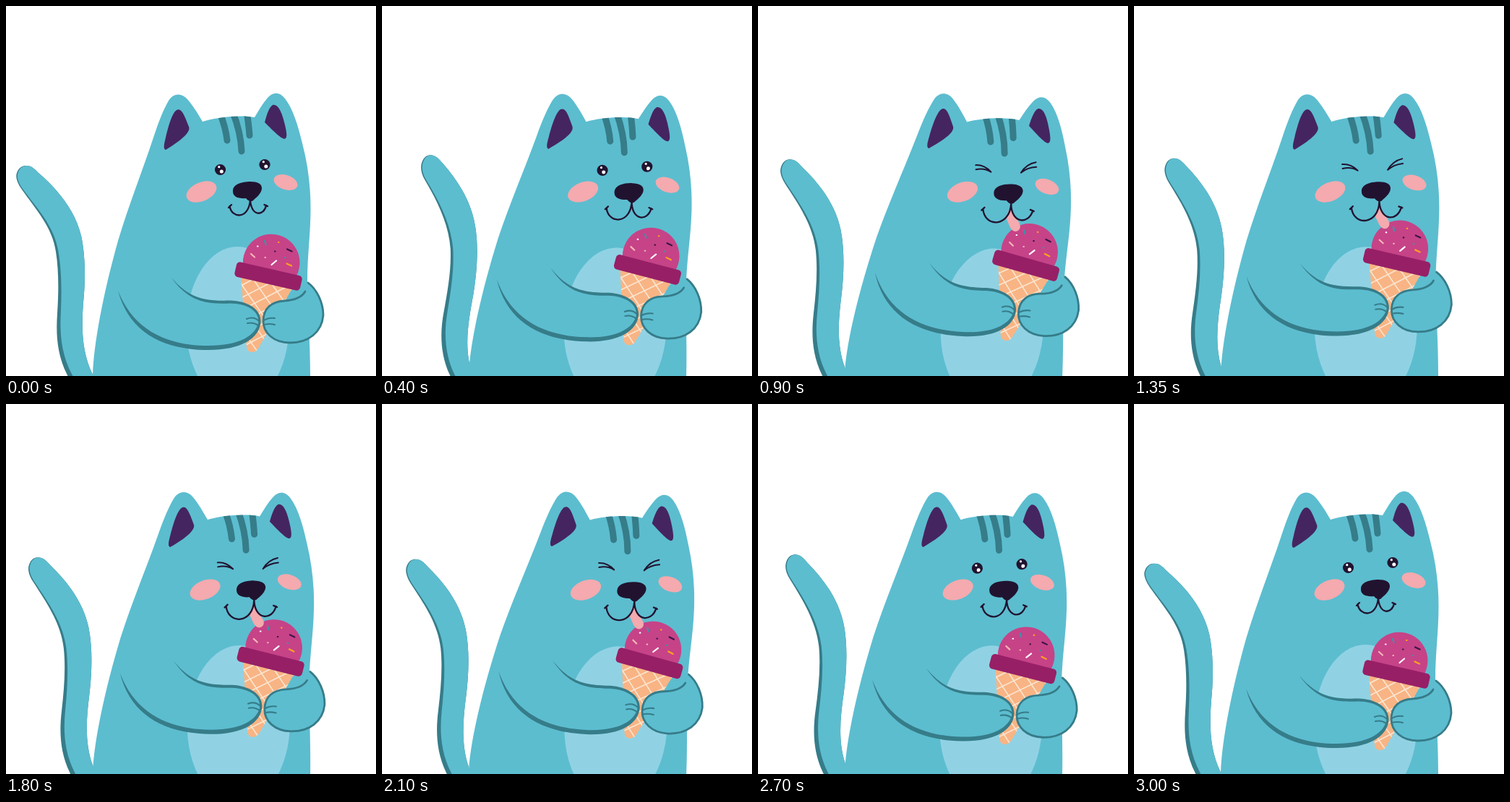
Animation of 512x512 px, one loop 3050 ms. Source, as an HTML page:

```html
<!DOCTYPE html>
<html lang="en">
<head>
<meta charset="utf-8">
<title>Cat with ice cream</title>
<style>
  html, body { margin: 0; width: 100%; height: 100%; overflow: hidden; background: #fff; }
  svg { display: block; width: 100vw; height: 100vh; }
  .skin { fill: #5cbdcf; }
  .shade { fill: #367c89; }
  .line { fill: none; stroke: #367c89; stroke-width: 2.1; stroke-linecap: round; }
  .ink { fill: #21132f; }
  .pen { fill: none; stroke: #21132f; stroke-width: 2.3; stroke-linecap: round; stroke-linejoin: round; }
  .pink { fill: #f4aaae; }
  .white { fill: #fff; }
</style>
</head>
<body>
<svg viewBox="0 0 512 512">
  <defs>
    <path id="tail"/>
    <path id="torso" d="M117 560L120 512C121 470 134 400 155 325C171 272 188.500 229 204 182C212 158 218 143 225 131C232 120 243 120 251 129C259 138 266 150 272 160C290 154 325 150 344 154C350 144 355 135 362 127C370 118 379 119 386 128C397 142 404 165 410 190C418 220 421.500 250 421.500 280C421.500 315 417 345 417 380C417 420 421 460 421 512L421 560Z"/>
    <path id="cone" d="M325 374L397 389L349 474C345 481 334 481 333 472Z"/>
    <clipPath id="inTail"><use href="#tail"/></clipPath>
    <clipPath id="inTorso"><use href="#torso"/></clipPath>
    <clipPath id="inCone"><use href="#cone"/></clipPath>
  </defs>

  <use href="#tail" class="shade"/>
  <g clip-path="url(#inTail)"><use href="#tail" class="skin" id="tailLight"/></g>

  <g id="cat">
    <use href="#torso" class="skin"/>
    <g clip-path="url(#inTorso)">
      <ellipse cx="320.500" cy="443" rx="71" ry="110" fill="#90d2e4"/>
      <path class="line" style="stroke-width:9" d="M296 148Q304 168 306 186M313.500 146Q325 175 326 201M333 146Q336 165 337 179"/>
    </g>
    <path fill="#452560" d="M221 199C217 198 219 190 221 182C225 165 230 148 236 144C243 140 247 152 253 167C256 174 244 185 221 199ZM358 161C361 150 364 140 369 137C376 135 381 146 384 157C387 168 390 180 387 183C384 187 372 175 358 161Z"/>
    <ellipse class="pink" rx="22" ry="13" transform="translate(270.500 257) rotate(-23)"/>
    <ellipse class="pink" rx="17" ry="10" transform="translate(387 244) rotate(18)"/>

    <g id="ice">
      <use href="#cone" fill="#f8b484"/>
      <g clip-path="url(#inCone)"><path id="waffle" fill="none" stroke="#fbe6d2" stroke-width="1.600"/></g>
      <path fill="#c64388" d="M329 364.500A39.300 39.300 0 1 1 399 378Z"/>
      <g id="sprinkles" fill="none" stroke-width="2.200" stroke-linecap="round"></g>
      <rect x="-46.500" y="-10.500" width="93" height="21" rx="5" fill="#971f66" transform="translate(363 374) rotate(13)"/>
    </g>

    <g id="leftArm">
      <path class="skin" d="M230 378C255 405 275 408 310 408C335 409 352 420 351 437C349 460 325 475 280 475C215 475 170 450 156 396Z"/>
      <path class="shade" d="M155 394C170 450 215 476 280 476C325 476 351 460 352.500 437C353 420 335 408 310 407.500C275 408.500 254 405 229 376C252 408 275 413 310 411.500C335 412 349.500 422 349.500 437C346 456 323 470 280 470C220 470 176 447 155 394Z"/>
      <path class="line" d="M333 433Q343 429 350 436M334 439Q342 437 349 442"/>
    </g>
    <g id="rightArm">
      <path class="skin" d="M417 382C430 392 439 410 439 428C437 452 418 466 393 466C370 466 356 452 356 436C356 418 368 409 385 408C402 407 410 402 414 394Z"/>
      <path class="line" style="stroke-width:2.800" d="M418 383C430 392 439 410 439 428C437 452 418 466 393 466C370 466 356 452 356 436C356 418 368 409 385 408C402 407 410 402 414 395"/>
      <path class="line" d="M357 435Q363 431 372 432M357 441Q364 439 372 441"/>
    </g>

    <g id="openEyes">
      <g id="eye" transform="translate(296.500 226.500)">
        <circle class="ink" r="7.600"/>
        <circle class="white" cx="1.800" cy="2.500" r="2.500"/>
        <circle class="white" cx="-1.700" cy="-3.800" r="1.600"/>
      </g>
      <use href="#eye" x="61.500" y="-7"/>
    </g>
    <path id="shutEyes" class="pen" style="stroke-width:2" d="M287 219Q299 218 308.500 227.500M287.500 225Q299 222 308.500 227.500M350 226.500Q357 214 370 211M350 226.500Q358 219 371 217.500"/>
    <path id="tongue" class="pink" d="M338 274C334 284 331 289 335 295C338 301 340 307.500 346.500 308C353 307 354 301 351 296C348 290 342 288 338 274Z"/>
    <path class="ink" d="M314 257C313 247 326 243 338 243C348 243 354 246 354 252C354 258 348 264 343 268C340 272 335 270 332 266C322 267 314 264 314 257Z"/>
    <path id="mouth" class="pen"/>
  </g>
</svg>
<script>
const LOOP = 3050;
const $ = id => document.getElementById(id);

// Left side first, then round the tip and down the right side.
const TAIL_LEFT = "M90 520C70 487 69 455 71 425C73 395 73 365 69 340C64 305 40 280 22 254C15 244 13 236 15 231C18 222 24 221 28 221C36 221 40 226 45 231C75 257 96 285 104 318C110 345 110 380 107 410C104 445 105 480 120 510L125 520Z";
const TAIL_RIGHT = "M100 520C82 490 81 455 87 425C93 395 99 365 98 335C96 300 80 265 64 237C59 228 58 220 60 213C63 204 68 202 72 202C79 202 84 208 89 214C111 240 127 268 132 300C137 330 134 365 129 395C122 430 116 460 121 490L124 520Z";
const SMILE = "M308 279L312 275M309.5 277C312 294 336 296 338 268C339 292 357 291 360 276M357.5 275L362 277";
const GRIN = "M298 281L302 277M300 279C303 305 338 303 338.5 270C340 298 364 298 369 278M365.5 277L370.5 279";

// Pairs of [time, value], eased between neighbours.
const SWAY = [[0, 0], [700, 1], [900, 1], [1450, 0], [2250, 1], [2400, 1], [3000, 0], [LOOP, 0]];
const LIFT = [[0, 0], [700, 1], [2400, 1], [3000, 0], [LOOP, 0]];
const WAG = [[0, 0], [500, .98], [1050, .25], [1500, .75], [1950, .25], [2425, 1], [3000, 0], [LOOP, 0]];
const TAIL_LAG = 50;

function track(keys, t) {
  const i = keys.findIndex(k => k[0] > t);
  const [t0, a] = keys[i - 1], [t1, b] = keys[i];
  return a + (b - a) * (1 - Math.cos(Math.PI * (t - t0) / (t1 - t0))) / 2;
}

// Mixes two paths of equal structure, x by kx and y by ky.
function blend(from, to, kx, ky = kx) {
  const ends = to.match(/[\d.]+/g);
  let i = 0;
  return from.replace(/[\d.]+/g, n => {
    const k = i % 2 ? ky : kx;
    return (+n + (ends[i++] - n) * k).toFixed(2);
  });
}

const move = (id, value) => $(id).setAttribute("transform", value);
const show = (id, on) => $(id).style.display = on ? "" : "none";

let grid = "";
for (let i = -5; i <= 5; i++) {
  grid += `M${300 + i * 6} ${417 + i * 14}l120 -62M${350 + i * 15} ${420 - i * 9}m-50 -72l100 144`;
}
$("waffle").setAttribute("d", grid);

$("sprinkles").innerHTML = [
  ["#fff", "M348 332.500h.5M367.500 358L374 352.500"],
  ["#f7b7b5", "M339 343L344 347.500M358.500 348h.5"],
  ["#3d93a5", "M358 325L359.500 330M386 348h.5"],
  ["#fba31c", "M377 327h.5M388.500 356.500L395 359.500"],
  ["#3a1646", "M389 336.500L395.500 339.500M372 339.500h.5"]
].map(([color, d]) => `<path stroke="${color}" d="${d}"/>`).join("");

function draw(now) {
  const t = now % LOOP;
  const lift = track(LIFT, t);
  const wag = track(WAG, t);
  const rise = track(WAG, Math.max(0, t - TAIL_LAG));
  const happy = lift > .9;

  $("tail").setAttribute("d", blend(TAIL_LEFT, TAIL_RIGHT, wag, rise));
  move("tailLight", `translate(1.3 0) rotate(-1 ${27 + 44 * wag} ${222 - 18 * rise})`);
  move("cat", `rotate(${2.8 * track(SWAY, t)} 271 512)`);
  move("ice", `translate(0 ${-19.5 * lift})`);
  move("leftArm", `translate(0 ${-19.5 * lift})`);
  move("rightArm", `translate(0 ${-15.5 * lift})`);

  $("mouth").setAttribute("d", blend(SMILE, GRIN, lift));
  show("openEyes", !happy);
  show("shutEyes", happy);
  show("tongue", happy);
  const out = Math.min(1, Math.max(0, (lift - .85) / .13));
  move("tongue", `translate(338 276) scale(${out}) translate(-338 -276)`);
  requestAnimationFrame(() => draw(performance.now() - start));
}

const start = performance.now();
draw(0);
</script>
</body>
</html>
```
